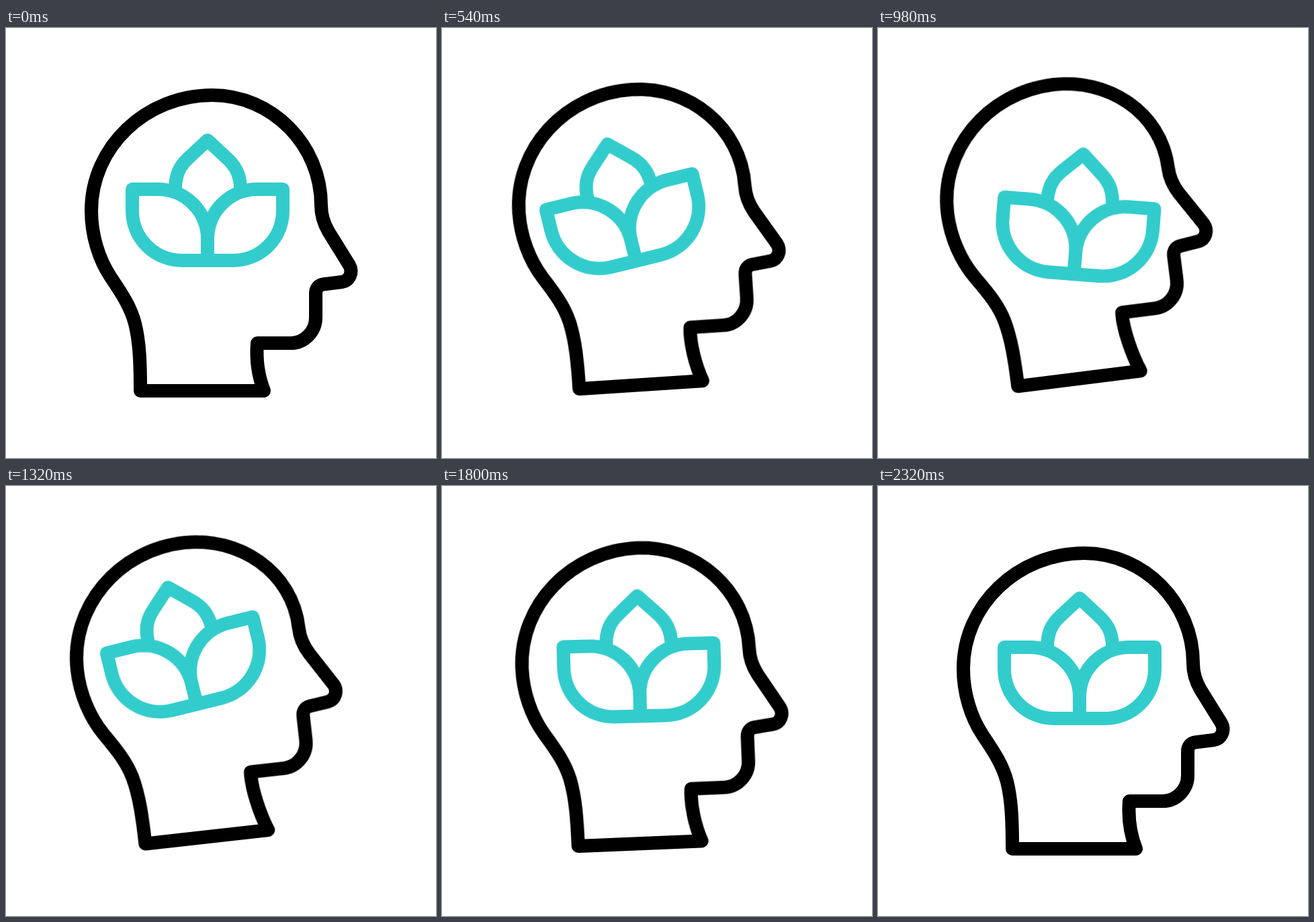
Write an HTML page that moves like this. It is 640 by 640 pixels and loops after 2.4 s.

```html
<!DOCTYPE html>
<html lang="en">
<head>
<meta charset="utf-8">
<title>Calm mind</title>
<style>
  html, body { margin: 0; height: 100%; overflow: hidden; background: #fff; }
  svg { display: block; width: 100vw; height: 100vh; }

  :root {
    --rest: path("M200 540C200 500 199 468 192 440C186 417 175 399 156 371C138 344 127 308 127 272C127 177 208 100 307 100C396 100 469 174 469 264c0 14 4 27 11 39l31 50c6 11 0 23.5 -11 25l-28 3.5c-7 1 -11 6.5 -11 13.5v36c0 21 -17 38 -37 38h-50C372 494 375 517 384 540Z");
    --raised: path("M200 540C200 500 199 468 192 440C186 417 175 399 156.5 371C139 344 128 308 128 272C128 178 208 101 307 101C388 101 462 160 462 244.5c0 14 4 27 11 39l31 50c6 11 0 23.5 -11 25l-28 3.5c-7 1 -11 6.5 -11 13.5v36c0 21 -17 38 -37 38h-50C365 474.5 375 517 384 540Z");
  }

  path {
    fill: none;
    stroke-width: 20;
    stroke-linejoin: round;
    stroke-linecap: round;
  }
  .head { stroke: #000; d: var(--rest); }
  .flower { stroke: #3cc; }

  .lift, .nod, .head, .sway, .bob, .tilt {
    animation: 2400ms cubic-bezier(.333, 0, .667, 1) infinite;
  }
  .lift { animation-name: lift; }
  .nod  { animation-name: nod; transform-origin: 208px 474px; }
  .head { animation-name: raise; }
  .sway { animation-name: sway; transform-origin: 300px 346px; }
  .bob  { animation-name: bob; }
  .tilt { animation-name: tilt; transform-origin: 300px 371px; }

  @keyframes lift {
    0%, 96.67%, 100% { transform: translateY(0); }
    51.67% {
      transform: translateY(-8.1px);
      animation-timing-function: cubic-bezier(.33, 0, .7, .88);
    }
  }
  @keyframes nod {
    0%, 94.2%, 100% { transform: rotate(0deg); }
    44.17% { transform: rotate(-7.25deg); }
  }
  @keyframes raise {
    0%, 95.4%, 100% { d: var(--rest); }
    46.25% { d: var(--raised); }
  }
  @keyframes sway {
    0%, 95.4%, 100% { transform: translateX(0) rotate(0deg); }
    46.67% { transform: translateX(-12.6px) rotate(-4deg); }
  }
  @keyframes bob {
    0%, 22.5%, 80.5%, 100% { transform: translateY(0); }
    40.83% { transform: translateY(20.2px); }
    57.5% { transform: translateY(-24.6px); }
  }
  @keyframes tilt {
    0%, 66.67%, 100% { transform: rotate(0deg); }
    22.5% { transform: rotate(-11.9deg); }
    40.83% { transform: rotate(8.3deg); }
    55% { transform: rotate(-10.2deg); }
  }
</style>
</head>
<body>
<svg viewBox="0 0 640 640">
  <g class="lift"><g class="nod"><path class="head"/></g></g>
  <g class="bob"><g class="sway"><g class="tilt">
    <path class="flower" d="M252 240C252 219 258 206 271 194L300 167L329 194C342 206 349 219 349 240"/>
    <path class="flower" d="M300 346V314A74 74 0 0 0 226 240H188V272A74 74 0 0 0 262 346H338A74 74 0 0 0 412 272V240H374A74 74 0 0 0 300 314"/>
  </g></g></g>
</svg>
</body>
</html>
```
